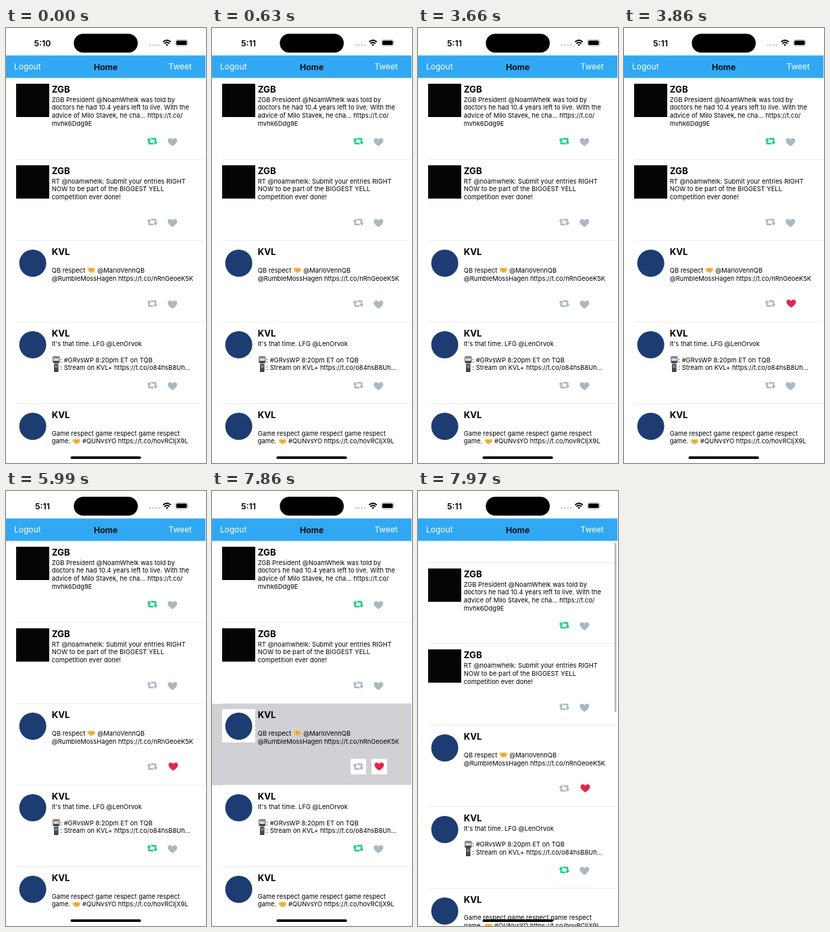
Write an HTML page that moves like this. It is 296 px wide and 640 px high and loops after 8000 ms.

```html
<!DOCTYPE html>
<html lang="en">
<head>
<meta charset="utf-8">
<title>Home feed</title>
<style>
  html, body { margin: 0; width: 100%; height: 100%; overflow: hidden; background: #fff; }
  body { position: relative; font-family: Inter, Roboto, sans-serif; color: #000; }
  body > *, .row > * { position: absolute; }
  #feed { left: 0; top: 73.4px; width: 295.2px; }
  .row { position: absolute; left: 0; width: 100%; height: 119.8px; }
  .row::before { content: ""; position: absolute; left: 15px; right: 0; top: -.5px; height: 1px; background: #ececee; }
  .row.pressed { background: #d1d1d5; }
  .avatar { left: 15px; top: 8.5px; width: 49px; height: 49px; background: #fff; }
  .title { left: 67.7px; top: 8.5px; font: 700 13.2px/16px Inter, Roboto, sans-serif; }
  .text { left: 67.7px; top: 26.4px; font-size: 9.4px; line-height: 11.7px; letter-spacing: .02px; white-space: pre; }
  .text svg { width: 12.6px; height: 12.6px; margin: -3px 0; }
  .button { top: 81.2px; width: 23px; height: 23px; background: #fff; fill: #aab8c2; }
  .share { left: 205px; }
  .heart { left: 235.5px; }
  .heart path { transform: translate(-1.1px, 1.5px); }
  .share.on { fill: #19cf86; }
  .heart.on { fill: #e2264d; }
  .heart.on path { transform: none; }
  #chrome { left: 0; top: 0; }
  #chrome text { font-size: 12px; }
  #chrome .bold { font-size: 12.4px; font-weight: 600; text-anchor: middle; }
</style>
</head>
<body>
<svg width="0" height="0">
  <symbol id="hands" viewBox="0 0 13 13">
    <path d="M.4 4.2 3 2.7 6.3 3.5 9.8 2.6 12.6 4.3 11.8 7.4 8.2 10.2Q6.8 11 5.2 9.8L1.2 7.4Z" fill="#f6bd45"/>
    <path d="M6.3 3.5 4.6 5.6Q6 6.6 7.3 5.3L10.7 8M4 8.8l1.2-1.3M5.6 9.9 6.8 8.5" fill="none" stroke="#b87920" stroke-width=".8"/>
  </symbol>
  <symbol id="tv" viewBox="0 0 13 13">
    <rect x="1" y=".8" width="11" height="11" rx="2.5" fill="#77777b"/>
    <rect x="2.2" y="2.4" width="8.6" height="5.5" rx="1.2" fill="#d9d5d5"/>
    <path d="M2.2 3.2h8.6" stroke="#a9443f" stroke-width="1.2"/>
    <path d="M2.5 9.8h8" stroke="#29292c" stroke-width="2"/>
  </symbol>
  <symbol id="phone" viewBox="0 0 13 13">
    <rect x="3.2" y=".2" width="6.6" height="12.6" rx="1.3" fill="#2c2c31"/>
    <rect x="4.2" y="1.8" width="4.6" height="4.6" fill="#7189a0"/>
    <path d="M4.5 8h4M4.5 10h4" stroke="#85858c" stroke-dasharray="1 .5"/>
  </symbol>
</svg>

<div id="feed"></div>

<svg id="chrome" width="296" height="640">
  <rect width="296" height="41" fill="#fff"/>
  <rect y="40.4" width="295.2" height="33" fill="#30a8f3"/>
  <text id="clock" class="bold" x="54" y="26.7">5:10</text>
  <rect x="100.4" y="8.4" width="94.6" height="27.9" rx="13.9"/>
  <path d="M213 25.2h14" stroke="#c3c3c5" stroke-width="2.5" stroke-linecap="round" stroke-dasharray="0 4.4"/>
  <path d="M232.5 20.5Q238.2 15.5 243.9 20.5M234.5 23Q238.2 19.7 241.9 23" fill="none" stroke="#000" stroke-width="1.9"/>
  <path d="M236.3 24.4Q238.2 22.9 240.1 24.4L238.2 26.4Z"/>
  <rect x="250.8" y="17.3" width="18" height="9" rx="2.8" fill="none" stroke="#a8a8aa" stroke-width=".9"/>
  <rect x="252" y="18.5" width="15.6" height="6.6" rx="1.7"/>
  <path d="M270 20.3q1.4 1.5 0 3Z" fill="#a8a8aa"/>
  <text x="12" y="61.4" fill="#fff">Logout</text>
  <text class="bold" x="147.7" y="61.6">Home</text>
  <text x="275" y="61.4" fill="#fff" text-anchor="end">Tweet</text>
  <rect id="scrollbar" x="291" y="76" width="2.5" height="249" rx="1.25" fill="#b4b4b6"/>
  <rect x="95.4" y="630.2" width="104.4" height="3.8" rx="1.9"/>
</svg>

<script>
const LOOP = 8000;
const emoji = name => `<svg><use href="#${name}"/></svg>`;
const avatars = {
  ZGB: '<rect width="49" height="49" fill="#050506"/>',
  KVL: '<circle cx="24.6" cy="25" r="20" fill="#1d3d72"/>'
};
const posts = [
  ["ZGB", "ZGB President @NoamWhelk was told by\ndoctors he had 10.4 years left to live. With the\nadvice of Milo Stavek, he cha... https://t.co/\nmvhk6Ddg9E"],
  ["ZGB", "RT @noamwhelk: Submit your entries RIGHT\nNOW to be part of the BIGGEST YELL\ncompetition ever done!"],
  ["KVL", `\nQB respect ${emoji("hands")} @MarloVennQB\n@RumbleMossHagen https://t.co/nRnGeoeK5K`],
  ["KVL", `It's that time. LFG @LenOrvok\n\n${emoji("tv")}: #GRvsWP 8:20pm ET on TQB\n${emoji("phone")}: Stream on KVL+ https://t.co/o84hsB8Uh...`],
  ["KVL", `\nGame respect game respect game respect\ngame. ${emoji("hands")} #QUNvsYO https://t.co/hovRCIjX9L`]
];

const arrow = "M-4.8-5-1.4-1H-3.6V2.3H1L3 4.8H-4.6Q-6 4.8-6 3.4V-1H-8.2Z";
const heart = "M0 6C-3 4-7 .9-7-2.4-7-6.6-1.6-7.2 0-3.6 1.6-7.2 7-6.6 7-2.4 7 .9 3 4 0 6Z";
const button = (kind, shape) => `<svg class="button ${kind}" viewBox="-11.5 -11.5 23 23">${shape}</svg>`;

const feed = document.getElementById("feed");
feed.innerHTML = posts.map(([name, text], i) => `
  <div class="row" style="top:${i * 119.8}px">
    <svg class="avatar">${avatars[name]}</svg>
    <div class="title">${name}</div>
    <div class="text">${text}</div>
    ${button("share", `<path d="${arrow}"/><path d="${arrow}" transform="rotate(180)"/>`)}
    ${button("heart", `<path d="${heart}"/>`)}
  </div>`).join("");

const rows = [...feed.children];
const shares = rows.map(row => row.querySelector(".share"));
const likedHeart = rows[2].querySelector(".heart");
const clock = document.getElementById("clock");
const scrollbar = document.getElementById("scrollbar");
shares[0].classList.add("on");

function render() {
  const t = performance.now() % LOOP;
  const scrolled = t >= 7970;
  clock.textContent = t < 630 ? "5:10" : "5:11";
  likedHeart.classList.toggle("on", t >= 3860);
  shares[3].classList.toggle("on", t >= 5990);
  rows[2].classList.toggle("pressed", t >= 7860 && !scrolled);
  feed.style.top = (scrolled ? 105.2 : 73.4) + "px";
  scrollbar.style.visibility = scrolled ? "visible" : "hidden";
  requestAnimationFrame(render);
}
render();
</script>
</body>
</html>
```
